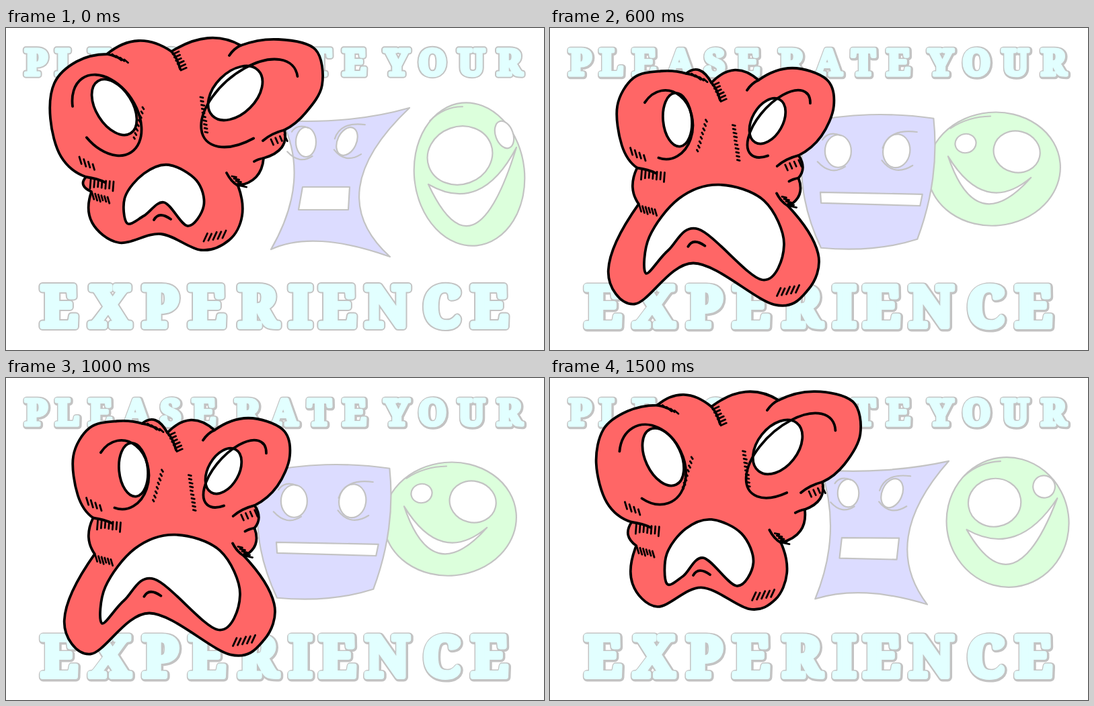
An HTML page for the animation above (1600 ms loop, 800 by 480 pixels).

```html
<!DOCTYPE html>
<html lang="en">
<head>
<meta charset="utf-8">
<title>Please rate your experience</title>
<style>
html, body { margin: 0; width: 100%; height: 100%; overflow: hidden; background: #fff; }
svg { display: block; width: 100vw; height: 100vh; }
path { stroke-linejoin: round; stroke-linecap: round; }
text { font-family: "Noto Serif", serif; font-weight: 900; text-anchor: middle; stroke-linejoin: round; }
</style>
</head>
<body>
<svg id="stage" viewBox="0 0 800 480"></svg>
<script>
const STEP = 100, STEPS = 16;
const GREY = '#c3c3c3', CYAN = '#e2ffff';
const stage = document.getElementById('stage');

function add(tag, attrs) {
  const el = document.createElementNS('http://www.w3.org/2000/svg', tag);
  for (const k in attrs) el.setAttribute(k, attrs[k]);
  return stage.appendChild(el);
}

// Each shape has three poses: start, middle and end of the swing.
// A parabola through them gives every pose between; "/" marks a corner.
function pose(keys, k) {
  const [a, b, c] = keys.map(s => s.match(/-?\d+/g));
  const u = (1 - k) * (2 - k) / 2, v = k * (2 - k), w = k * (k - 1) / 2;
  let i = 0;
  const mixed = keys[0].replace(/-?\d+/g, () => u * a[i] + v * b[i] + w * c[i++]);
  return mixed.split('/').map(seg => seg.split(' ').map(p => p.split(',').map(Number)));
}
const values = (keys, k) => pose(keys, k)[0][0];

// Catmull-Rom; open ends follow a parabola.
function curve(pts, loop) {
  const n = pts.length, last = loop ? n : n - 1;
  const beyond = (p, q, r) => p.map((v, k) => r ? 3 * v - 3 * q[k] + r[k] : 2 * v - q[k]);
  const at = i => {
    if (loop) return pts[(i + n) % n];
    if (i < 0) return beyond(pts[0], pts[1], pts[2]);
    if (i >= n) return beyond(pts[n - 1], pts[n - 2], pts[n - 3]);
    return pts[i];
  };
  let d = '';
  for (let i = 0; i < last; i++) {
    const a = at(i - 1), b = at(i), c = at(i + 1), e = at(i + 2);
    const h = b.map((v, k) => v + (c[k] - a[k]) / 6);
    const g = c.map((v, k) => v - (e[k] - b[k]) / 6);
    d += `C${h} ${g} ${c}`;
  }
  return d;
}
const line = pts => 'M' + pts[0] + curve(pts, false);

function outline(segs) {
  if (segs.length === 1) return 'M' + segs[0][0] + curve(segs[0], true) + 'Z';
  return 'M' + segs[0][0] + segs.map((seg, i) =>
    curve(i ? [segs[i - 1].at(-1), ...seg] : seg, false)).join('') + 'Z';
}

// Part of a turned ellipse, angles in degrees.
function arc([x, y, rx, ry, turn, from, to]) {
  const rad = Math.PI / 180, c = Math.cos(turn * rad), s = Math.sin(turn * rad);
  const at = deg => {
    const p = rx * Math.cos(deg * rad), q = ry * Math.sin(deg * rad);
    return [x + p * c - q * s, y + p * s + q * c];
  };
  const big = Math.abs(to - from) > 180 ? 1 : 0;
  return `M${at(from)}A${rx} ${ry} ${turn} ${big} ${to > from ? 1 : 0} ${at(to)}`;
}
const oval = e => arc([...e, 0, 180]) + arc([...e, 180, 360]).replace(/^M[^A]+/, '') + 'Z';
const shift = ([x, y], list, size = 1) => list.map(([a, b]) => [x + a * size, y + b * size]);

// Ovals: centre x, y, radii, turn.
const green = {
  body: ['689,218,82,107,-6', '664,210,103,82,-8', '662,213,85,97,0'],
  left: ['675,190,49,43,-20', '630,176,20,20,0', '613,170,18,12,-40'],
  right: ['741,159,13,21,-20', '712,174,27,18,0', '674,197,43,53,30'],
  mouth: ['628,233 700,242 759,178/695,293 628,233',
          '600,205 666,233 734,198/664,253 600,205',
          '588,178 635,265 692,258/620,288 588,178']
};

const purple = {
  body: ['410,138 510,136 600,119/526,238 571,341/470,318 394,330/428,230 410,138',
         '388,138 480,135 577,133/554,230 545,325/475,326 398,328/389,235 388,138',
         '380,145 475,120 567,133/585,218 557,303/485,329 410,328/366,230 380,145'],
  left: ['446,170,15,22,0', '435,178,18,21,0', '421,190,21,30,0'],
  right: ['507,169,14,22,25', '513,179,18,24,15', '517,187,22,26,0'],
  mouth: ['441,237 511,237/509,271/435,271/441,237',
          '414,242 541,244/536,268/415,263/414,242',
          '391,248 565,252/565,261/390,260/391,248'],
  // creases around the eyes, from the eye centre
  leftFolds: [[[-22, -16], [-11, -24], [4, -22]], [[-29, 15], [-10, 27], [10, 22]]],
  rightFolds: [[[-19, -4], [-3, -23], [28, -26]], [[-20, 13], [-1, 26], [22, 20]]]
};

const red = {
  body: [
    '127,244 115,234 119,222/82,192 66,135 72,82 105,50 150,39/197,19 246,35/300,15 349,26/405,17 460,32 470,85 445,127 414,152/410,178 383,194/372,222 345,235/351,280 332,316 290,331 230,307 168,320 128,290 127,244',
    '131,261 120,235 127,205/96,175 84,115 105,70 145,55 186,53/210,46 234,66/275,43 319,58/370,39 425,55 437,95 417,143 382,172/383,193 371,209/372,242 346,264/372,320 358,368 318,385 215,333 138,390 103,345 131,261',
    '132,259 126,240 131,220/120,180 121,125 145,86 185,78 218,88/238,82 254,97/283,86 305,100/355,87 400,105 408,148 390,186 360,213/373,228 371,243/369,252 367,258/436,350 418,410 350,440 215,371 115,424 68,370 132,259'],
  left: ['161,118,27,46,-32', '184,125,24,43,-10', '191,154,18,36,-5'],
  right: ['341,97,31,48,45', '330,123,26,40,28', '316,156,19,34,38'],
  leftRing: ['150,130,44,66,-33,216,530', '163,134,46,54,-8,222,459', '183,160,30,51,0,219,506'],
  rightRing: ['362,112,85,47,-40,19,-250', '347,130,69,34,-47,30,-221', '334,158,55,27,-48,24,-232'],
  mouth: ['180,291 177,252 205,217 242,204 283,227 294,265 270,295 235,260 205,280',
          '155,346 160,292 195,244 243,227 300,247 329,305 300,351 218,289 182,325',
          '130,380 133,330 190,262 265,237 343,268 368,340 330,397 230,308 172,328'],
  // strokes running on past each corner of the body
  tails: [[28, 8], [22, 8], [13, 26], [-17, 15], [-32, 16], [-14, 5], [-17, -19]],
  lip: [[-15, 26], [-5, 19], [10, 25]]
};

// Hatching: anchor, first stroke, spread, stroke, count.
const hatches = [
  ['brow', [8, 0], [18, 8], [7, 6], 4],
  ['crease', [2, 4], [12, 24], [9, -4], 6],
  ['leftEye', [42, 0], [-13, 45], [2, 3], 8],
  ['rightEye', [-52, 6], [7, 52], [4, 1], 10],
  ['cheek', [-10, -30], [20, 11], [3, 10], 4],
  ['cheek', [7, 4], [34, 3], [-1, 13], 7],
  ['jaw', [1, 2], [23, 6], [3, 10], 6],
  ['ear', [-20, 14], [20, -7], [4, 9], 4],
  ['neck', [-9, -14], [12, 14], [9, 2], 5],
  ['chin', [4, -13], [28, -5], [6, -13], 5]
];

function hatching(spots) {
  let seed = 7, d = '';
  const rand = () => (seed = seed * 16807 % 2147483647) / 2147483647;
  for (const [name, from, spread, stroke, n] of hatches) {
    for (let i = 0; i < n; i++) {
      const k = i / (n - 1), len = 0.7 + 0.4 * rand();
      const p = spots[name].map((v, j) => v + from[j] + spread[j] * k);
      d += `M${p}l${stroke.map(v => v * len)}`;
    }
  }
  return d;
}

// Lettering: a grey rim below, a cyan face on top.
const rims = [];
function word(str, xs, y, size, rim) {
  const put = (color, w) => {
    const el = add('text', { x: xs.join(' '), y, 'font-size': size, fill: color, stroke: color, 'stroke-width': w });
    el.textContent = str;
    return el;
  };
  rims.push({ el: put(GREY, rim), rim });
  put(CYAN, rim - 4);
}
word('PLEASE', [45, 91, 140, 194, 245, 294], 70, 53, 9.5);
word('RATE', [359, 414, 466, 518], 70, 53, 9.5);
word('YOUR', [581, 634, 692, 749], 70, 53, 9.5);
word('EXPERIENCE', [79, 155, 230, 299, 375, 438, 493, 567, 648, 719], 445, 83, 12);

// Every face is a skin, white holes and drawn lines on top.
function face(fill, stroke, width) {
  const layer = (f, w) => add('path', { fill: f, stroke, 'stroke-width': w });
  return { skin: layer(fill, width), holes: layer('#fff', width), lines: layer('none', width), fine: layer('none', 2.8) };
}
const faces = { green: face('#dcffdc', GREY, 2.2), purple: face('#dcdcff', GREY, 2.2), red: face('#ff6666', '#000', 3.8) };
function show(name, parts) {
  for (const p in parts) faces[name][p].setAttribute('d', parts[p]);
}

function holes(shape, k) {
  return oval(values(shape.left, k)) + oval(values(shape.right, k)) + outline(pose(shape.mouth, k));
}

function drawGreen(k) {
  const [x, y, ...rest] = values(green.body, k);
  show('green', {
    skin: oval([x, y, ...rest]),
    holes: holes(green, k),
    lines: arc([x - 6, y + 6, ...rest, 238, 275])
  });
}

function drawPurple(k) {
  const folds = side => {
    const eye = values(purple[side], k);
    return purple[side + 'Folds'].map(f => line(shift(eye, f, eye[3] / 23))).join('');
  };
  show('purple', {
    skin: outline(pose(purple.body, k)),
    holes: holes(purple, k),
    lines: folds('left') + folds('right')
  });
}

function drawRed(k) {
  const body = pose(red.body, k), mouth = pose(red.mouth, k)[0];
  const corners = body.map(seg => seg.at(-1));
  const tails = red.tails.map(([x, y], i) =>
    line(shift(corners[i], [[0, 0], [x * 0.55, y * 0.4], [x, y]])));
  show('red', {
    skin: outline(body),
    holes: holes(red, k),
    lines: tails.join('') + arc(values(red.leftRing, k)) + arc(values(red.rightRing, k)) +
      line(shift(mouth[7], red.lip)),
    fine: hatching({
      cheek: corners[0], brow: corners[1], crease: corners[2], ear: corners[4], neck: corners[6],
      jaw: body[0][0], chin: body[7][2],
      leftEye: values(red.left, k).slice(0, 2), rightEye: values(red.right, k).slice(0, 2)
    })
  });
}

let shown = -1;
function draw(now) {
  const step = Math.floor(now / STEP) % STEPS;
  if (step === shown) return;
  shown = step;
  const k = Math.min(step, STEPS - step) / 4;   // there and back, 0 to 2
  drawGreen(k);
  drawPurple(k);
  drawRed(k);
  const heavy = step % 4 ? 1 : 0;
  for (const r of rims) {
    r.el.setAttribute('transform', `translate(${heavy},${heavy})`);
    r.el.setAttribute('stroke-width', r.rim + heavy);
  }
}
const start = performance.now();
function tick() {
  draw(performance.now() - start);
  requestAnimationFrame(tick);
}
tick();
</script>
</body>
</html>
```
